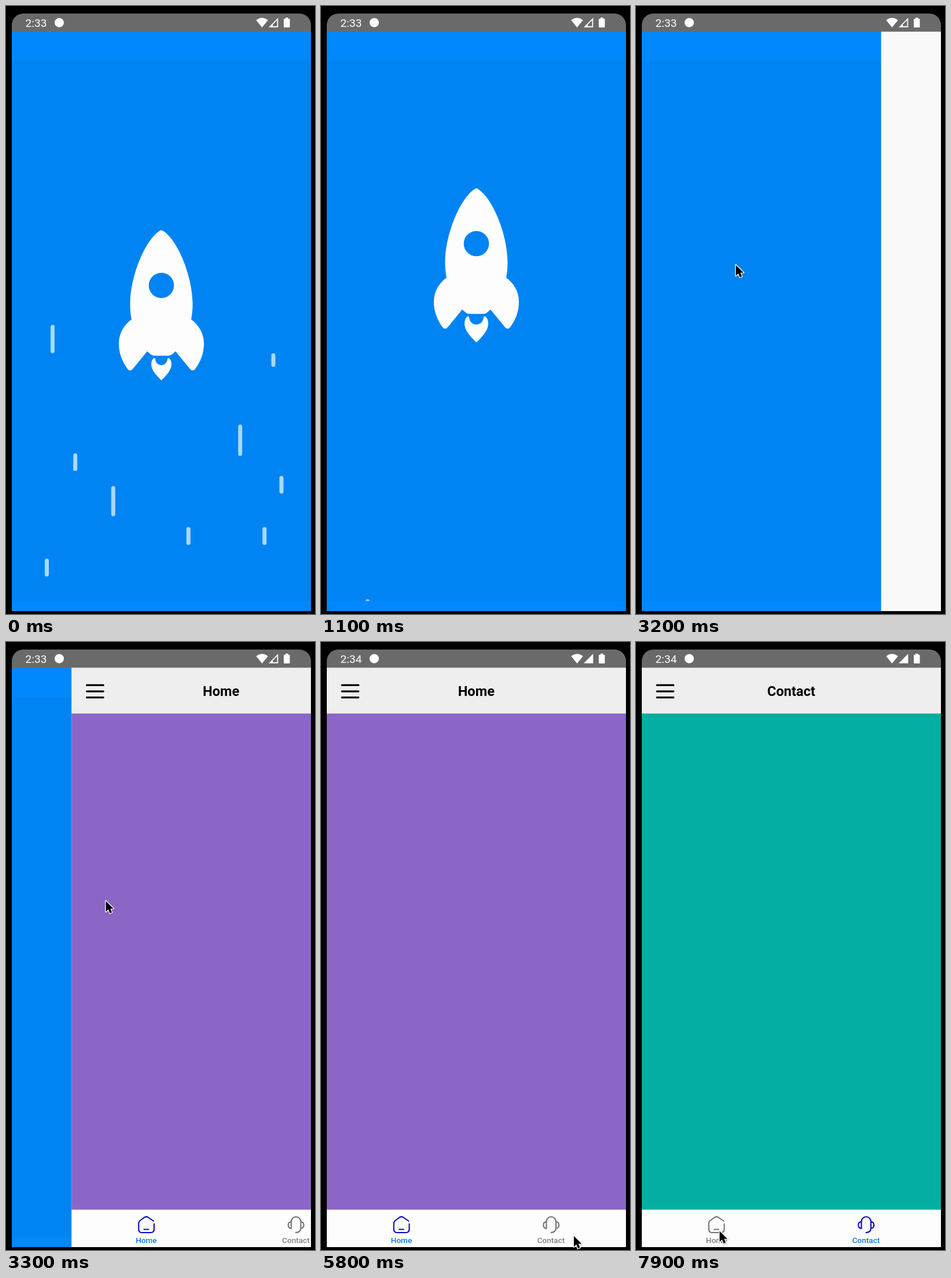
An HTML page for the animation above (8 s loop, 534 by 1048 pixels).

```html
<!DOCTYPE html>
<html lang="en">
<head>
<meta charset="utf-8">
<title>App launch</title>
<style>
  html, body { margin: 0; width: 100%; height: 100%; overflow: hidden; background: #000; }
  svg { display: block; width: 100%; height: 100%; }
  text { font-family: Roboto, Arial, sans-serif; }
  .title { font-size: 23.6px; font-weight: 700; text-anchor: middle; }
  .label { font-size: 13.6px; font-weight: 500; text-anchor: middle; }
  .icon { fill: none; stroke-width: 2.1; stroke-linecap: round; stroke-linejoin: round; }
</style>
</head>
<body>
<svg viewBox="0 0 534 1048" preserveAspectRatio="none">
  <defs>
    <clipPath id="phone"><path d="M10 1043V33a20 20 0 0 1 20-20H507a20 20 0 0 1 20 20V1043Z"/></clipPath>
    <clipPath id="sky"><rect x="10" y="94.5" width="517" height="931"/></clipPath>
    <clipPath id="tab"><rect x="10" y="978.5" width="517" height="65"/></clipPath>
    <clipPath id="tabRound"><circle cx="397.5" cy="1011" r="132.5"/></clipPath>
    <radialGradient id="soft">
      <stop offset=".5" stop-color="#9f9f9f"/>
      <stop offset=".75" stop-color="#9f9f9f" stop-opacity=".6"/>
      <stop offset="1" stop-color="#9f9f9f" stop-opacity="0"/>
    </radialGradient>
  </defs>

  <rect width="534" height="1048"/>
  <g clip-path="url(#phone)">
    <rect x="10" y="44" width="517" height="1000" fill="#0188fd"/>
    <rect x="10" y="94.5" width="517" height="931" fill="#0084f3"/>
    <g clip-path="url(#sky)">
      <path id="streaks" stroke="#a9d8fa" stroke-width="7" stroke-linecap="round" d="M80.5 553v42M462 602v16.5M404.7 725v47M119.7 774.5v23.5M476 813.5v23.5M185.3 831v45M315.3 901.5v24M446.7 901.5v24M70.5 956v24"/>
      <g id="rocket" fill="#fdfdfd">
        <path d="M-2 .8Q0-.6 2 .8C28 16 54 80 54 127C54 138 53 146 51.5 154C64 163 73.5 177 73.5 196C73.5 213 67 228 58 240Q54 244 50 240L24.5 209L18 214.5Q15 216.5 11 216.5H-11Q-15 216.5-18 214.5L-24.5 209L-50 240Q-54 244-58 240C-67 228-73.5 213-73.5 196C-73.5 177-64 163-51.5 154C-53 146-54 138-54 127C-54 80-28 16-2 .8Z"/>
        <circle cy="95.3" r="21.8" fill="#0084f3"/>
        <path id="flame" d="M-10.5 2C-10.5 8-6 12.7 0 12.7C6 12.7 10.5 8 10.5 2Q12-1 14.5 2C17.5 6 18.3 11 16.5 17C14 25 7 32 0 39C-7 32-14 25-16.5 17C-18.3 11-17.5 6-14.5 2Q-12-1-10.5 2Z"/>
      </g>
    </g>

    <g id="app">
      <rect x="10" y="44" width="517" height="1000" fill="#f9f9f9"/>
      <g id="content">
        <rect x="10" y="44" width="517" height="80" fill="#eee"/>
        <path d="M36.3 74.4H64.7M36.3 85.1H64.7M36.3 95.6H64.7" stroke="#000" stroke-width="3.4" stroke-linecap="round"/>
        <text id="title" class="title" x="268.3" y="93"></text>
        <rect id="page" x="10" y="123.3" width="517" height="856"/>
        <rect x="10" y="978.5" width="517" height="65" fill="#fdfdfd"/>
        <g clip-path="url(#tab)"><g clip-path="url(#tabRound)">
          <circle id="ripple" cy="1011" fill="url(#soft)"/>
        </g></g>
        <path id="homeIcon" class="icon" d="M152.5 1003V1012Q152.5 1018 146.5 1018H131.5Q125.8 1018 125.8 1012V1002.5Q125.8 999 128.6 997L136 991.6Q139 989.6 142 991.6L151.5 998M135 1012.5H143"/>
        <path id="contactIcon" class="icon" d="M389.5 1011V999A8.25 8.25 0 0 1 406 999V1010Q406 1017.5 397.5 1018M389.5 999Q384.3 1000 384.3 1005Q384.3 1010 389.5 1011M406 999Q411.2 1000 411.2 1005Q411.2 1010 406 1010.7"/>
        <text id="homeLabel" class="label" x="139" y="1036.3">Home</text>
        <text id="contactLabel" class="label" x="397.5" y="1036.3">Contact</text>
      </g>
    </g>

    <rect x="10" y="13" width="517" height="31.3" fill="#6a6a6a"/>
    <g fill="#fff">
      <text id="clock" x="33.5" y="36" font-size="19.2"></text>
      <circle cx="92" cy="28.7" r="8"/>
      <path d="M432.3 24.5Q442.5 16.5 452.7 24.5L442.5 37Z"/>
      <path id="signal" fill-rule="evenodd"/>
      <path d="M483 20H487.5V22H489.5Q490.5 22 490.5 23V36Q490.5 37 489.5 37H481Q480 37 480 36V23Q480 22 481 22H483Z"/>
    </g>
  </g>
  <path id="cursor" d="M0 0V18.5L4.3 14.4L7 21.2L10.6 19.7L7.8 13.2H13.4Z" stroke="#fff" stroke-width="2.8" stroke-linejoin="round" paint-order="stroke" style="filter:drop-shadow(0 1px 1px rgba(0,0,0,.3))"/>
</svg>

<script>
const LOOP = 8000, STEP = 100;
const $ = id => document.getElementById(id);
const set = (id, attrs) => {
  for (const key in attrs) $(id).setAttribute(key, attrs[key]);
};
const show = (id, on) => set(id, { visibility: on ? 'inherit' : 'hidden' });
const progress = (t, from, to) => Math.max(0, Math.min(1, (t - from) / (to - from)));
const easeInOut = q => q < .5 ? 4 * q ** 3 : 1 - 4 * (1 - q) ** 3;
const smooth = q => q * q * (3 - 2 * q);

// each move of the pointer: from when, until when, to which place
const enter = { x: 43, y: 440 };
const moves = [
  { from: 2200, to: 2400, x: 172.5, y: 446.5 },
  { from: 3800, to: 4300, x: 70.5, y: 96 },
  { from: 4400, to: 4800, x: 144, y: 1016 },
  { from: 4800, to: 4900, x: 123, y: 992 },
  { from: 5500, to: 5800, x: 437, y: 1024 },
  { from: 5900, to: 6200, x: 129, y: 1008 },
  { from: 6400, to: 7000, x: 405, y: 1010 },
  { from: 7300, to: 7900, x: 144.5, y: 1015.5 }
];

function drawPointer(t) {
  let { x, y } = enter;
  for (const move of moves) {
    const q = smooth(progress(t, move.from, move.to));
    x += (move.x - x) * q;
    y += (move.y - y) * q;
  }
  show('cursor', t >= moves[0].from);
  set('cursor', { transform: `translate(${x} ${y})` });
}

function drawSplash(t) {
  set('streaks', { transform: `translate(0 ${t * .43})` });
  show('rocket', t < 1300);
  // a slight dip, then an accelerating lift-off
  const dip = 2.6 * Math.sin(progress(t, 0, 600) * Math.PI / 2);
  const lift = 129 * progress(t, 600, 1200) ** 3;
  set('rocket', { transform: `translate(268.5 ${386.3 + dip - lift})` });
  const burn = 1 + .35 * (1 - Math.cos(t / 200 * Math.PI)) / 2;
  set('flame', { transform: `translate(0 220) scale(${burn})` });
}

function drawTab(name, active) {
  set(name + 'Icon', { stroke: active ? '#0808c8' : '#747474' });
  set(name + 'Label', { fill: active ? '#0c7bdc' : '#808080' });
}

function drawApp(t) {
  const slide = easeInOut(progress(t, 3060, 3440));
  show('app', slide > 0);
  set('app', { transform: `translate(${517 * (1 - slide)} 0)` });
  show('content', t >= 3300);

  const contact = t >= 7300;
  $('title').textContent = contact ? 'Contact' : 'Home';
  set('page', { fill: contact ? '#04aea3' : '#8c66c7' });
  drawTab('home', !contact);
  drawTab('contact', contact);

  const press = progress(t, 7040, 7200);
  show('ripple', press > 0 && !contact);
  set('ripple', { cx: 405 - 44 * press, r: 131 * press });
}

function drawStatus(t) {
  $('clock').textContent = t < 3600 ? '2:33' : '2:34';
  const gap = t < 5200 ? 'M461 34.7H468.5V24.5L461 32Z' : '';
  set('signal', { d: 'M454 36.7H470.3V20.3Z' + gap });
}

function draw(t) {
  drawSplash(t);
  drawApp(t);
  drawStatus(t);
  drawPointer(t);
}

// time advances in ten steps per second
let start;
function tick(now) {
  start ??= now;
  draw(Math.floor((now - start) % LOOP / STEP) * STEP);
  requestAnimationFrame(tick);
}
draw(0);
requestAnimationFrame(tick);
</script>
</body>
</html>
```
